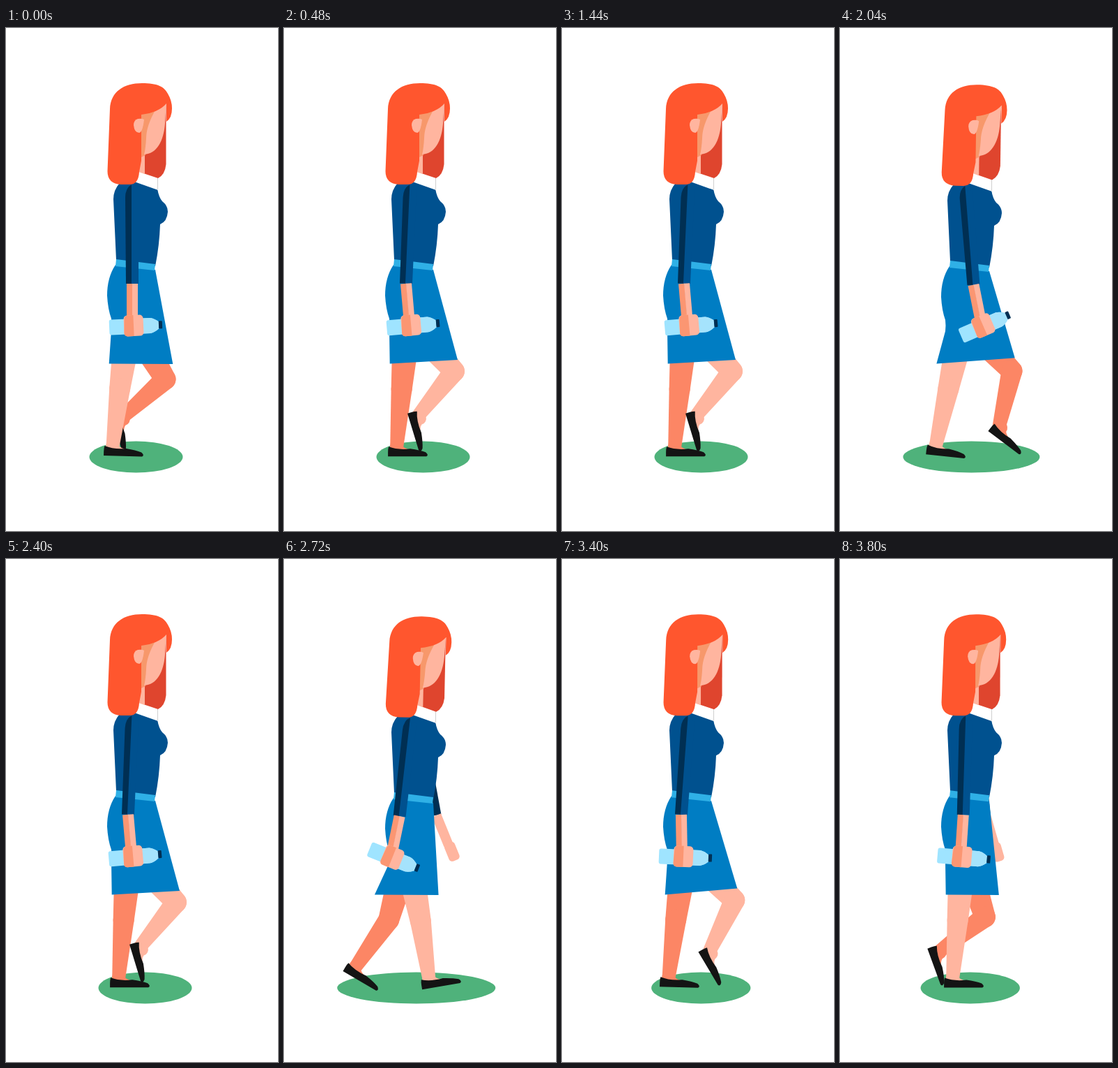
Animation, 390 px wide and 720 px high, one loop 3.84 s. Source, as an HTML page:

```html
<!DOCTYPE html>
<html lang="en">
<head>
<meta charset="utf-8">
<title>Walk cycle</title>
<style>
  html, body { margin: 0; width: 100%; height: 100%; overflow: hidden; background: #fff; }
  svg { display: block; }
  .light { fill: #ffb59f; }
  .deep { fill: #fc8665; }
  .shade { fill: #fb9672; }
  .top { fill: #00518f; }
  .navy { fill: #002f53; }
  .hair { fill: #ff562e; }
  .shoe { fill: #141414; }
</style>
</head>
<body>
<svg width="390" height="720" viewBox="0 0 390 720">
  <defs>
    <path id="thigh" d="M-21 0H21L15 100A15 15 0 0 1 -15 100Z"/>
    <path id="calf" d="M-15 0A15 15 0 0 1 15 0L9 90H-9Z"/>
    <path id="ankle" d="M-9 -8A9 9 0 0 1 9 -8Q12 -4 22 -2H-10Z"/>
    <path id="shoe" d="M-11 -7Q2 -2 20 -4Q34 -2 42 1Q47 5 43 7H-12V1Q-12 -4 -11 -7Z"/>
  </defs>

  <ellipse id="ground" cy="614" ry="22.5" fill="#4fb27b"/>

  <g id="farUpper"><path class="navy" d="M-7 0H7V130H-7Z"/></g>
  <g id="farFore" class="light">
    <path d="M-7 0H7V46H-7Z"/>
    <rect x="-7" y="43" width="16" height="27" rx="5"/>
  </g>

  <g id="farLeg" class="deep"></g>
  <g id="nearLeg" class="light"></g>

  <path id="skirt" fill="#007dc3"/>
  <g id="body">
    <path class="top" d="M163 222L190 217L217 230Q219 242 224 248Q232 254 232 263Q231 277 221 281Q220 311 214 341L158 332L154 245Q154 232 163 222Z"/>
    <path fill="#2fb0e6" d="M158 331L214 338L213 347L157 341Z"/>
    <path fill="#fff" d="M192 206L218 216V232L184 220Z"/>
    <path d="M217.5 215V231" stroke="#bbb" stroke-width=".7"/>
  </g>

  <g id="nearUpper">
    <path class="top" d="M-2 -2H9V133H-2Z"/>
    <path class="navy" d="M-1 -9Q-10 -4 -10 10L-9 133H-1V0Z"/>
  </g>
  <g id="nearFore">
    <path class="shade" d="M-8 0H.5V52H-8Z"/>
    <path class="light" d="M0 0H8V52H0Z"/>
  </g>
  <g id="hand">
    <path fill="#9fe4ff" d="M-32 -10H24Q30 -9 36 -4V6Q30 11 24 12H-32Q-35 12 -35 9V-7Q-35 -10 -32 -10Z"/>
    <path fill="#a5e3fc" d="M0 -10H24Q30 -9 36 -4V6Q30 11 24 12H0Z"/>
    <rect class="navy" x="36" y="-5" width="5" height="11" rx="1"/>
    <rect class="light" x="-14" y="-15" width="28" height="30" rx="5"/>
    <path class="shade" d="M0 -15H-9Q-13 -14 -13 -9L-14 10Q-14 15 -9 15H0Z"/>
  </g>

  <g id="head">
    <path fill="#df452e" d="M198 106H229.5V195Q228 210 218 215L197 208Z"/>
    <path class="light" d="M190 170H199V209L190 206Z"/>
    <path class="shade" d="M188 120H200V182L194 185H190Z"/>
    <path class="light" d="M194 122L230 104L228 137C226 162 216 180 198 181Z"/>
    <path fill="#f7986b" d="M193 122L215 116Q201 140 201 158Q200 174 198 181L193 184Z"/>
    <path class="hair" d="M149 116C150 91 169 79 195 79C217 79 227 84 232 94Q238 104 238 115Q238 129 230 134V108Q219 121 194 124V190L191 206Q190 224 177 224H165Q145.500 223 145.500 205Z"/>
    <path class="light" d="M198 131Q195 129 189 130Q183 132 183 139Q184 150 191 150Q196 149 198 131Z"/>
  </g>
</svg>
<script>
const CYCLE = 960, STEP = 40, LAG = 440;
const THIGH = 100, CALF = 90;

// Key poses of one stride: ms, then thigh, calf and foot angle in degrees.
const STRIDE = [
  [120, -12.5, 12.5, 6],
  [250, -18, 30, 22],
  [400, 18, 53, 70],
  [480, 42, 39, 73],
  [560, 44, 13, 37],
  [690, 27, -16, -15],
  [920, -4.8, 4.8, 0]
];

const $ = id => document.getElementById(id);
const RAD = Math.PI / 180;

// Smooth periodic curve through one column of STRIDE, flat at its peaks.
function stride(time, column) {
  const n = STRIDE.length;
  const t = (time - STRIDE[0][0] + CYCLE) % CYCLE + STRIDE[0][0];
  const at = i => STRIDE[(i + n) % n][column];
  const ms = i => STRIDE[(i + n) % n][0] + Math.floor(i / n) * CYCLE;
  const slope = i => (at(i + 1) - at(i)) * (at(i) - at(i - 1)) <= 0 ? 0
    : (at(i + 1) - at(i - 1)) / (ms(i + 1) - ms(i - 1));
  let i = n - 1;
  while (ms(i) > t) i--;
  const d = ms(i + 1) - ms(i), u = (t - ms(i)) / d, v = 1 - u;
  return v * v * (1 + 2 * u) * at(i) + u * u * (3 - 2 * u) * at(i + 1)
    + d * u * v * (v * slope(i) - u * slope(i + 1));
}

function place(el, [x, y], angle) {
  el.setAttribute('transform', `translate(${x.toFixed(2)} ${y.toFixed(2)}) rotate(${angle.toFixed(2)})`);
}

// Point (x, y) of a frame turned by angle around an origin.
function reach([ox, oy], angle, x, y) {
  const c = Math.cos(angle * RAD), s = Math.sin(angle * RAD);
  return [ox + x * c - y * s, oy + x * s + y * c];
}

function buildLeg(id) {
  $(id).innerHTML = '<use href="#thigh"/><use href="#calf"/>' +
    '<g><use href="#ankle"/><use href="#shoe" class="shoe"/></g>';
}

function poseLeg(id, hip, time) {
  const [thigh, calf, foot] = [1, 2, 3].map(column => stride(time, column));
  const [a, b, c] = $(id).children;
  const knee = reach(hip, -thigh, 0, THIGH);
  place(a, hip, -thigh);
  place(b, knee, calf);
  place(c, reach(knee, calf, 0, CALF), foot);
  return thigh;
}

function poseArm(side, shoulder, upper, fore, length) {
  const elbow = reach(shoulder, -upper, 0, length);
  place($(side + 'Upper'), shoulder, -upper);
  place($(side + 'Fore'), elbow, -fore);
  return elbow;
}

function draw(t) {
  const phase = 2 * Math.PI * t / CYCLE;
  const wave = (mean, c, s) => mean + c * Math.cos(phase) + s * Math.sin(phase);
  const sway = Math.cos(2 * phase);
  const bob = 2 - 2 * sway;

  $('ground').setAttribute('cx', wave(193, -6.5, 0));
  $('ground').setAttribute('rx', 98 - 31 * sway);

  const hip = [177, 417 + bob];
  const far = poseLeg('farLeg', hip, t + LAG);
  const near = poseLeg('nearLeg', hip, t);

  // The thighs push the hem out, and a high knee lifts its front.
  const lead = Math.max(far, near), trail = Math.min(far, near);
  const back = 154 - .1 * trail ** 2;
  const front = 212 + .88 * lead;
  const lift = .06 * Math.max(0, lead - 32) ** 2;
  const y = n => n + bob;
  $('skirt').setAttribute('d', `M157 ${y(339)}Q145 ${y(357)} 145 ${y(383)}` +
    `Q146 ${y(402)} 151 ${y(416)}Q152 ${y(424)} 151 ${y(432)}` +
    `L${back} 480.5L${front} ${481 - lift}L214 ${y(346)}Z`);

  place($('body'), [0, bob], 0);
  $('head').setAttribute('transform', `translate(0 ${bob}) rotate(${bob * .4} 185 222)`);

  poseArm('far', [195, 236 + bob], wave(3, 1, -8), wave(10.5, 2.5, -12), 130);
  const fore = wave(2.5, -2.5, 15);
  const elbow = poseArm('near', [181, 233 + bob], wave(-1.3, 1.3, 6.9), fore, 133);
  place($('hand'), reach(elbow, -fore, 2, 60), wave(-3.8, 1.2, -29));
}

function tick() {
  draw(Math.floor(performance.now() / STEP) * STEP % CYCLE);
  requestAnimationFrame(tick);
}

buildLeg('farLeg');
buildLeg('nearLeg');
tick();
</script>
</body>
</html>
```
